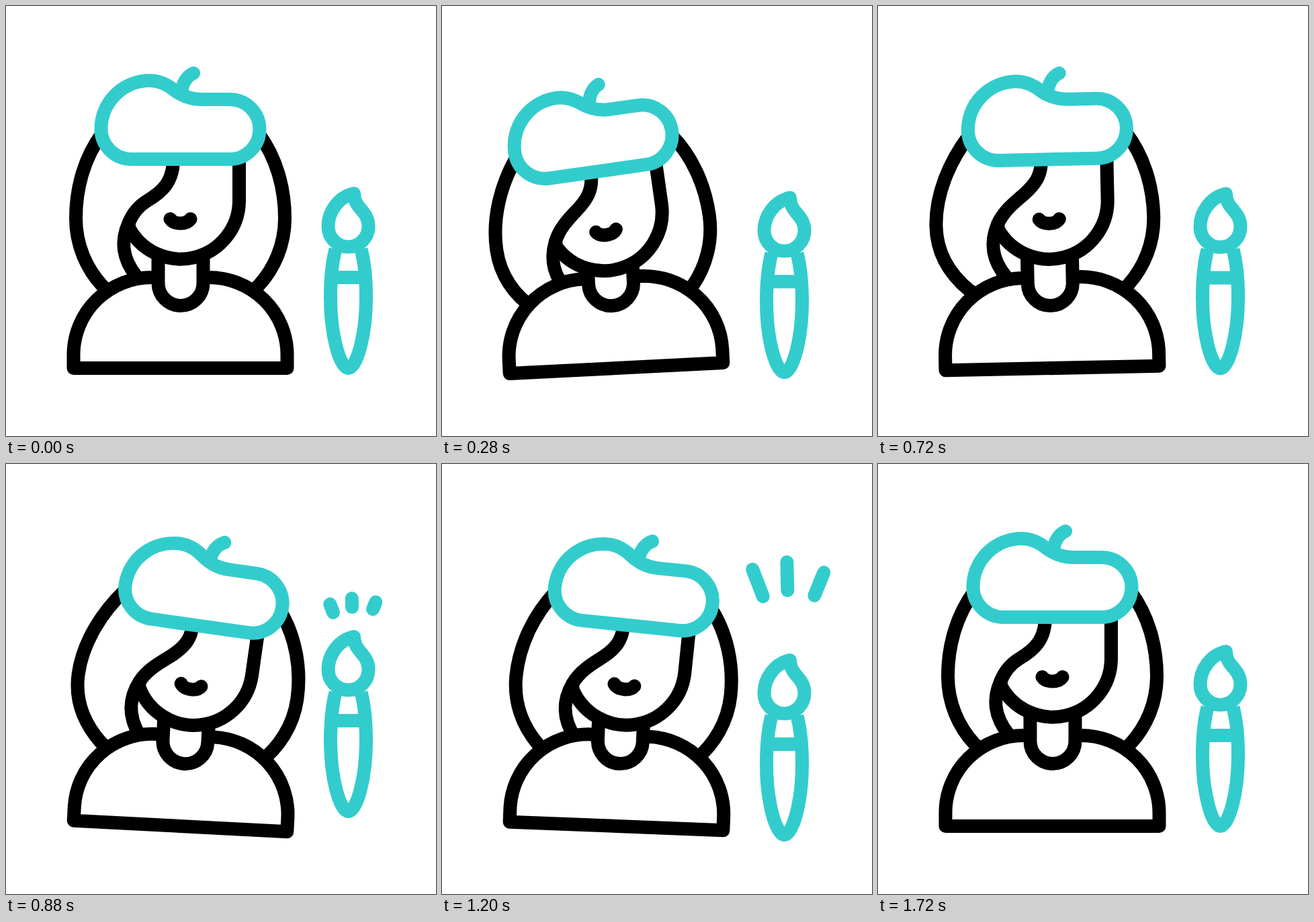
These frames come from a looping animation (640x640 px, 2 s). An HTML page:

```html
<!DOCTYPE html>
<html lang="en">
<head>
<meta charset="utf-8">
<title>Artist and brush</title>
<style>
  html, body { margin: 0; width: 100%; height: 100%; overflow: hidden; background: #fff; }
  svg { display: block; width: 100%; height: 100%; }
  path { fill: none; stroke: #000; stroke-width: 20; stroke-linejoin: round; }
  .teal path { stroke: #33cccc; }
  .solid { fill: #fff; }
  .round { stroke-linecap: round; }

  .sway, .head, .neck, .brush, .hair, .face, .rays path {
    animation: 2s cubic-bezier(.333, 0, .667, 1) infinite;
  }
  .sway { transform-origin: 260px 539px; animation-name: sway; }
  .head { transform-origin: 260px 374px; animation-name: tilt, dip; }
  .neck { animation-name: follow; }
  .brush { animation-name: bounce; }
  .hair.left { animation-name: swing-left; }
  .hair.right { animation-name: swing-right; }
  .face { animation-name: swing-fringe; }
  .rays path { animation-name: burst; visibility: hidden; }

  @keyframes sway {
    0%, 78%, 100% { rotate: 0deg; }
    26% { rotate: -5.15deg; }
    47.5% { rotate: 3.6deg; }
  }
  @keyframes tilt {
    0%, 75%, 100% { rotate: 0deg; }
    22% { rotate: -7.4deg; }
    48.5% { rotate: 6.1deg; }
  }
  @keyframes dip {
    0%, 35%, 76%, 100% { translate: 0 0; }
    16%, 50% { translate: 0 17.3px; }
  }
  @keyframes follow {
    0%, 75%, 100% { translate: 0 0; }
    22% { translate: -3px 0; }
    48.5% { translate: .6px 0; }
  }
  @keyframes bounce {
    0%, 10%, 82.5%, 100% { translate: 0 0; }
    26% { translate: 0 39.5px; }
    43%, 51.5% { translate: 0 -22px; }
    64.5% { translate: 0 26px; }
  }
  @keyframes swing-left {
    0%, 74%, 100% { d: path("M143 190C117 225 104 270 104 316C104 356 120 391 143 416L170 442"); }
    21%, 45% { d: path("M143 190C113 228 91 276 91 324C91 362 108 394 138 420L170 442"); }
  }
  @keyframes swing-right {
    0%, 36%, 72%, 100% { d: path("M376 190C402 225 415 270 415 316C415 356 399 391 376 416L349 442"); }
    50% { d: path("M376 190C405 225 421 270 421 316C421 356 403 391 378 416L349 442"); }
  }
  @keyframes swing-fringe {
    0%, 74%, 100% { d: path("M249 228C249 262 232 277 210 290C197 298 188 310 183 322L183 330A87 87 0 0 0 347 291V228"); }
    21%, 51% { d: path("M249 228C250.500 251 239 265 224 278C210 290 192.500 302 183 322L183 330A87 87 0 0 0 347 291V228"); }
  }
  /* Each ray grows from the brush, then its tail catches up with its tip. */
  @keyframes burst {
    0%, 39% { stroke-dasharray: 0 200; stroke-dashoffset: 0; visibility: hidden; }
    40% { visibility: visible; }
    56% { stroke-dasharray: 75 200; stroke-dashoffset: 0; }
    66% { visibility: visible; }
    67%, 100% { stroke-dasharray: 0 200; stroke-dashoffset: -100; visibility: hidden; }
  }
</style>
</head>
<body>
<svg viewBox="0 0 640 640">
  <g class="sway">
    <g class="head">
      <path class="hair left" d="M143 190C117 225 104 270 104 316C104 356 120 391 143 416L170 442"/>
      <path class="hair right" d="M376 190C402 225 415 270 415 316C415 356 399 391 376 416L349 442"/>
      <path d="M183 322C172 346 170 372 194 402"/>
    </g>
    <path class="solid" d="M226 404H217A116.500 115 0 0 0 100.500 519V539H418.500V519A116.500 115 0 0 0 302 404H293"/>
    <path class="neck solid" d="M226.500 370V412.500A33.500 33.500 0 0 0 293.500 412.500V370"/>
    <g class="head">
      <path class="face solid" d="M249 228C249 262 232 277 210 290C197 298 188 310 183 322L183 330A87 87 0 0 0 347 291V228"/>
      <path class="round" d="M244.500 317C250 325.500 269 325.500 274.500 317"/>
      <g class="teal">
        <path class="round" d="M261 130C262 117 268 105 279 100"/>
        <path class="solid" d="M187 228A45.500 45 0 0 1 141.500 183A72.500 72 0 0 1 214 111C228 111 240 117 250 125C262 134 276 139 291 139H333A44.500 44.500 0 0 1 333 228Z"/>
      </g>
    </g>
  </g>
  <g class="teal rays round">
    <path pathLength="100" d="M487 221L457 143.500"/>
    <path pathLength="100" d="M515 213L513 132"/>
    <path pathLength="100" d="M546 216L573 150"/>
  </g>
  <g class="teal brush">
    <path d="M490.500 362C485 383 483 407 483 434C483 490 497 539 509.500 539C522 539 536 490 536 434C536 407 534 383 528.500 362M485 404H534"/>
    <path class="solid" d="M518 279C495 284 479.500 306 479.500 328C479.500 345 493 358.500 509.500 358.500C526 358.500 539.500 345 539.500 328C539.500 304 518 302 518 279Z"/>
  </g>
</svg>
</body>
</html>
```
